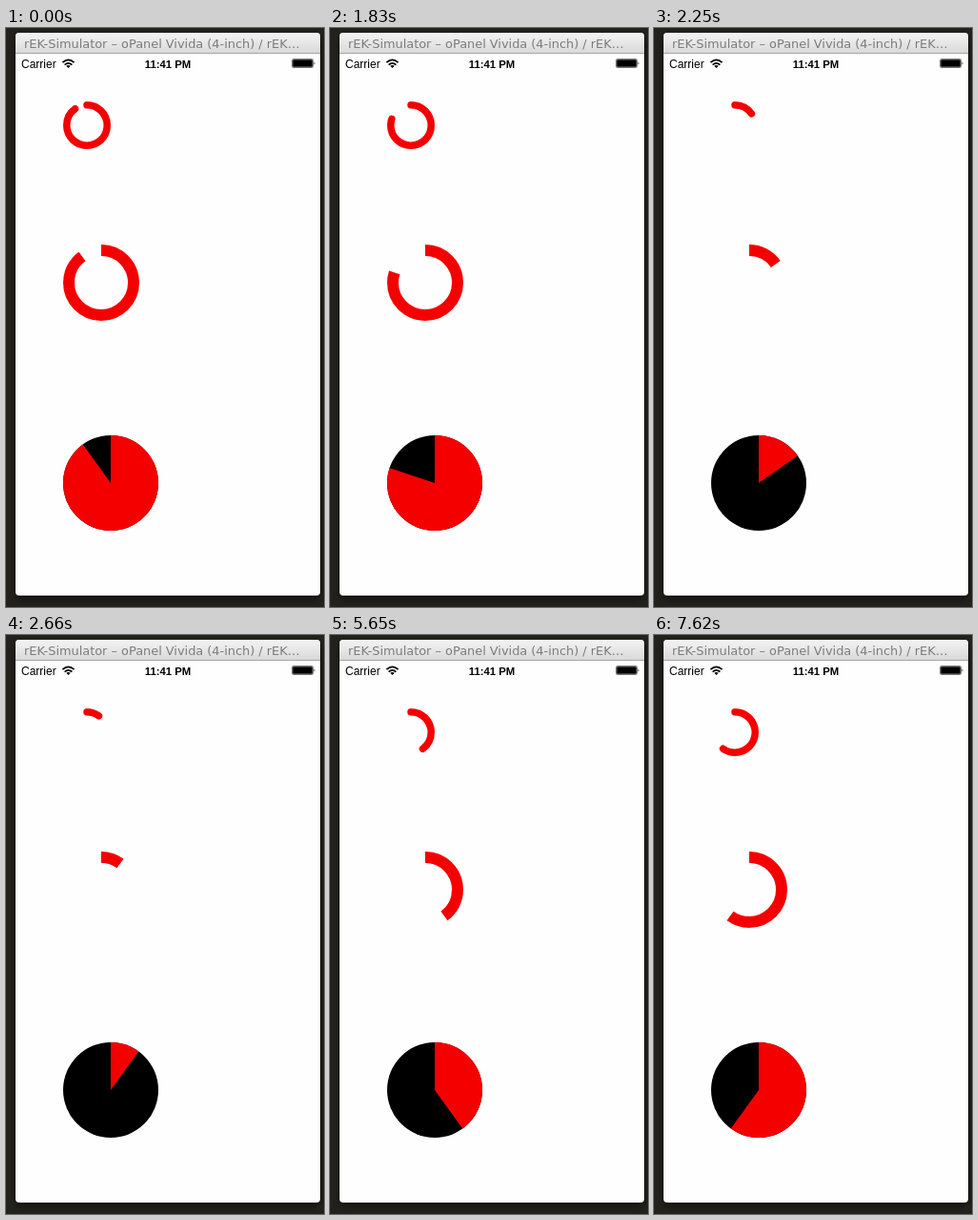
Animation of 334 by 607 pixels, one loop 8000 ms. Source, as an HTML page:

```html
<!DOCTYPE html>
<html lang="en">
<head>
<meta charset="utf-8">
<title>Circular progress</title>
<style>
  html, body { margin: 0; width: 100%; height: 100%; overflow: hidden; background: #24221c; }
  svg { display: block; width: 334px; height: 607px; }
  .title { font: 12.9px "DejaVu Sans", sans-serif; fill: #7c7c7c; }
  .status { font: 12px "Liberation Sans", Arial, sans-serif; }
  .clock { font-size: 11.3px; font-weight: bold; text-anchor: middle; }
  .bar { fill: none; stroke: #f50000; }
</style>
</head>
<body>
<svg viewBox="0 0 334 607">
  <defs>
    <linearGradient id="chrome" x2="0" y2="1">
      <stop stop-color="#f4f4f4"/>
      <stop offset="1" stop-color="#d8d8d8"/>
    </linearGradient>
    <filter id="soft" x="-10%" y="-10%" width="120%" height="120%">
      <feGaussianBlur stdDeviation="4"/>
    </filter>
  </defs>

  <rect width="334" height="607" fill="#24221c"/>
  <rect x="10" y="9" width="320" height="590" rx="5" opacity=".5" filter="url(#soft)"/>
  <rect x="10" y="5" width="320" height="590" rx="4" fill="#fefefe"/>
  <path d="M10 27V9a4 4 0 0 1 4-4H326a4 4 0 0 1 4 4V27z" fill="url(#chrome)"/>
  <path d="M10 26.5H330" stroke="#a6a6a6"/>
  <text class="title" x="19" y="21">rEK-Simulator – oPanel Vivida (4-inch) / rEK…</text>

  <text class="status" x="16" y="42">Carrier</text>
  <g fill="none" stroke="#000" stroke-width="1.7">
    <path d="M59.4 36.2Q65.5 30.6 71.6 36.2M61.6 38.6Q65.5 35 69.4 38.6"/>
    <path d="M65.5 42L63.3 39.8Q65.5 38 67.7 39.8z" fill="#000" stroke="none"/>
  </g>
  <text class="status clock" x="170" y="42">11:41 PM</text>
  <rect x="300.5" y="32.5" width="22" height="9" rx="1.2" fill="none" stroke="#777"/>
  <rect x="301.2" y="33.2" width="20.6" height="7.6" rx=".6"/>
  <path d="M323.6 35.2Q325.4 37 323.6 38.8z"/>

  <circle cx="110" cy="477" r="50"/>
  <g id="dials"></g>
</svg>
<script>
const LOOP = 8000;

// centre x, centre y, outer radius, thickness ratio, cap
const dials = [
  [85, 102, 25, 0.3, 'round'],
  [100, 267, 40, 0.3, 'butt'],
  [110, 477, 50, 1, 'butt']
];

// start, from, to; a full turn takes one second
const moves = [
  [500, 0.9, 1], [1521, 1, 0], [2520, 0, 0.1], [3515, 0.1, 0.2],
  [4534, 0.2, 0.3], [5508, 0.3, 0.4], [6495, 0.4, 0.5], [7515, 0.5, 0.6]
];

// moments at which the display refreshes
const ticks = [
  0, 540, 630,
  ...Array.from({ length: 16 }, (_, i) => 1590 + 60 * i),
  2560, 2610, 2660, 3560, 3620, 4580, 4630,
  5530, 5590, 5650, 6540, 6600, 7560, 7620
];

const bars = dials.map(([cx, cy, radius, ratio, cap]) => {
  const width = radius * ratio;
  const bar = document.createElementNS('http://www.w3.org/2000/svg', 'circle');
  const attrs = {
    class: 'bar', cx, cy, r: radius - width / 2, pathLength: 1,
    'stroke-width': width, 'stroke-linecap': cap,
    transform: `rotate(-90 ${cx} ${cy})`
  };
  for (const key in attrs) bar.setAttribute(key, attrs[key]);
  document.getElementById('dials').append(bar);
  return bar;
});

// cubic-bezier(.42, 0, .58, 1), solved by bisection
function easeInOut(x) {
  if (x <= 0) return 0;
  if (x >= 1) return 1;
  let lo = 0, hi = 1, s;
  for (let i = 0; i < 20; i++) {
    s = (lo + hi) / 2;
    const at = 1.26 * (1 - s) ** 2 * s + 1.74 * (1 - s) * s * s + s ** 3;
    if (at < x) lo = s; else hi = s;
  }
  return s * s * (3 - 2 * s);
}

function progressAt(time) {
  const [start, from, to] = moves.findLast(m => m[0] <= time) || moves[0];
  const span = 1000 * Math.abs(to - from);
  return from + (to - from) * easeInOut((time - start) / span);
}

function draw() {
  const time = performance.now() % LOOP;
  const value = progressAt(ticks.findLast(t => t <= time));
  const dash = value >= 1 ? 'none' : `${Math.max(value, 0.001)} 2`;
  for (const bar of bars) bar.setAttribute('stroke-dasharray', dash);
  requestAnimationFrame(draw);
}
draw();
</script>
</body>
</html>
```
